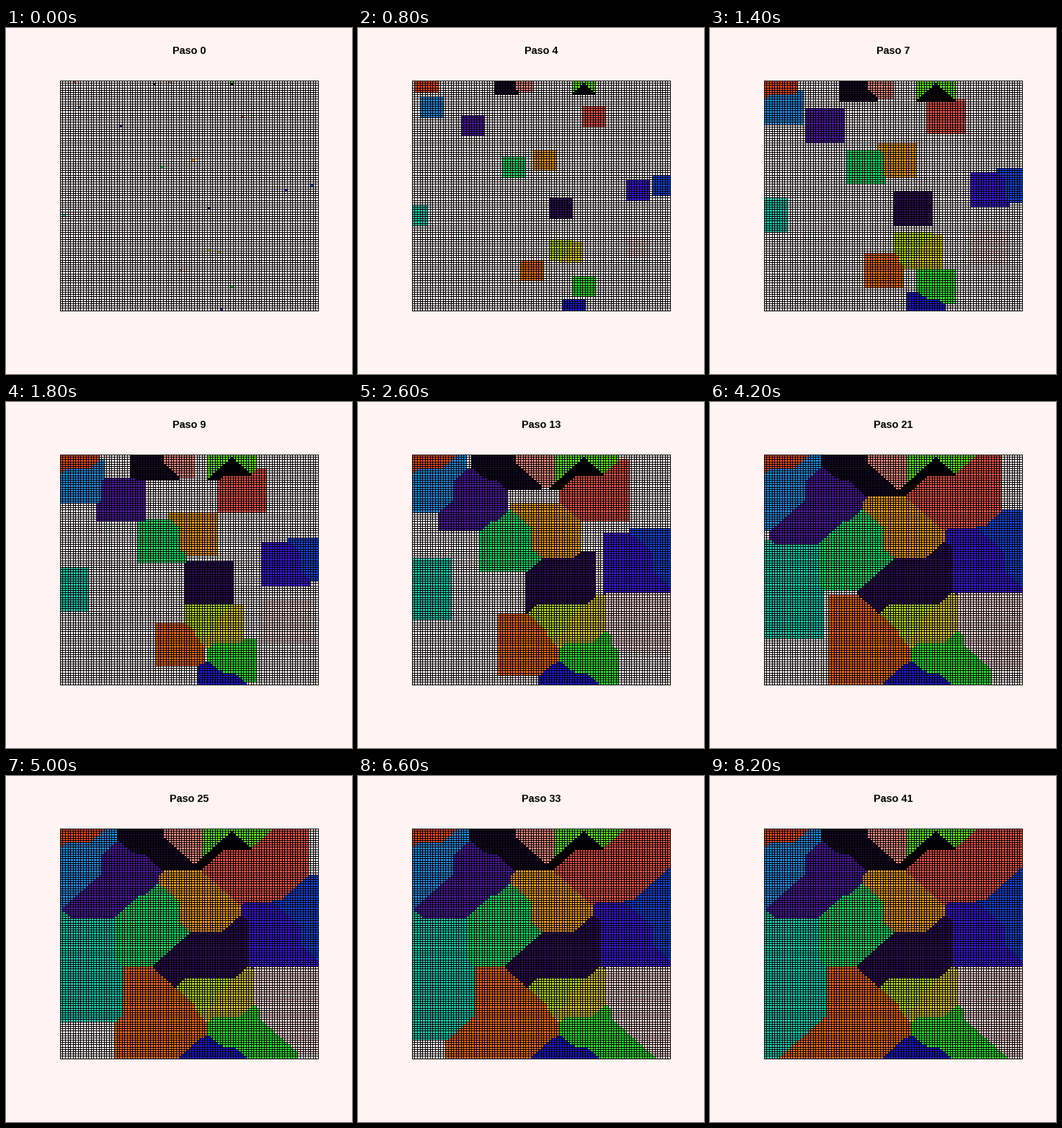
These frames come from a looping animation (480x480 px, 8.4 s). A matplotlib script:

```python
import numpy as np
import matplotlib.pyplot as plt
from matplotlib.animation import FuncAnimation
from matplotlib.colors import to_rgb

STAGE = 480
N = 100
STEPS = 42
PAGE = "#fff4f3"
EMPTY = "#fff3f5"

# Plot region in pixels: margins counted in text lines
LINE = 14.4
X0, X1 = 4.1 * LINE, STAGE - 2.1 * LINE
Y0, Y1 = 4.1 * LINE, STAGE - 5.1 * LINE
SPAN = (N + 1) * 1.08       # axis 0..N+1 with 4 % padding at both ends
PAD = (N + 1) * 0.04 + 0.5  # first cell edge, in cells

# column, row, colour
SEEDS = [
    (5, 0, "#f04a0c"), (7, 11, "#1492ec"), (36, 1, "#140a24"),
    (42, 0, "#f48e86"), (66, 0, "#66f010"), (66, 1, "#050008"),
    (70, 15, "#f05548"), (23, 19, "#5019a6"), (51, 34, "#f8a010"),
    (39, 37, "#10e872"), (97, 45, "#1048e8"), (87, 47, "#3e16e6"),
    (57, 55, "#2e0c58"), (1, 58, "#08d4b8"), (57, 73, "#b8dc10"),
    (61, 74, "#dccc18"), (87, 72, "#ffd8dc"), (46, 82, "#f86c08"),
    (66, 89, "#20f028"), (62, 99, "#2018d8"),
]
PALETTE = np.array([to_rgb(EMPTY)] + [to_rgb(c) for _, _, c in SEEDS])

# Neighbours column by column; the first occupied one wins
NEIGHBOURS = [(dx, dy) for dx in (-1, 0, 1) for dy in (-1, 0, 1) if dx or dy]


def grow(grid):
    padded = np.pad(grid, 1)
    new = grid.copy()
    for dx, dy in NEIGHBOURS:
        near = padded[1 + dy:N + 1 + dy, 1 + dx:N + 1 + dx]
        new = np.where(new == 0, near, new)
    return new


def simulate():
    grid = np.zeros((N, N), dtype=int)
    for k, (col, row, _) in enumerate(SEEDS, 1):
        grid[row, col] = k
    states = [grid]
    while len(states) < STEPS:
        states.append(grow(states[-1]))
    return states


def pixel_cells(lines):
    """Cell index of every pixel from the first grid line to the last."""
    pixels = np.arange(lines[0], lines[-1] + 1)
    cells = np.searchsorted(lines, pixels, side="right") - 1
    return np.clip(cells, 0, N - 1)


EDGES = (PAD + np.arange(N + 1)) / SPAN
X_LINES = np.floor(X0 + (X1 - X0) * EDGES).astype(int)
Y_LINES = np.floor(Y1 - (Y1 - Y0) * EDGES).astype(int)[::-1]
CELLS = np.ix_(pixel_cells(Y_LINES), pixel_cells(X_LINES))
STATES = simulate()


def render(grid):
    rgb = PALETTE[grid[CELLS]]
    rgb[Y_LINES - Y_LINES[0]] = 0
    rgb[:, X_LINES - X_LINES[0]] = 0
    return rgb


fig = plt.figure(figsize=(STAGE / 100, STAGE / 100), dpi=100, facecolor=PAGE)
ax = fig.add_axes([0, 0, 1, 1])
ax.axis("off")
board = ax.imshow(
    render(STATES[0]), interpolation="nearest", aspect="auto",
    extent=(X_LINES[0], X_LINES[-1] + 1, Y_LINES[-1] + 1, Y_LINES[0]))
ax.set_xlim(0, STAGE)
ax.set_ylim(STAGE, 0)
title = ax.text((X0 + X1) / 2, 36, "", ha="center", va="baseline",
                color="black", family="Liberation Sans", weight="bold",
                fontsize=LINE * 0.72)


def update(step):
    board.set_data(render(STATES[step]))
    title.set_text(f"Paso {step}")
    return board, title


anim = FuncAnimation(fig, update, frames=STEPS, interval=200,
                     repeat=True, repeat_delay=0)
plt.show()
```
